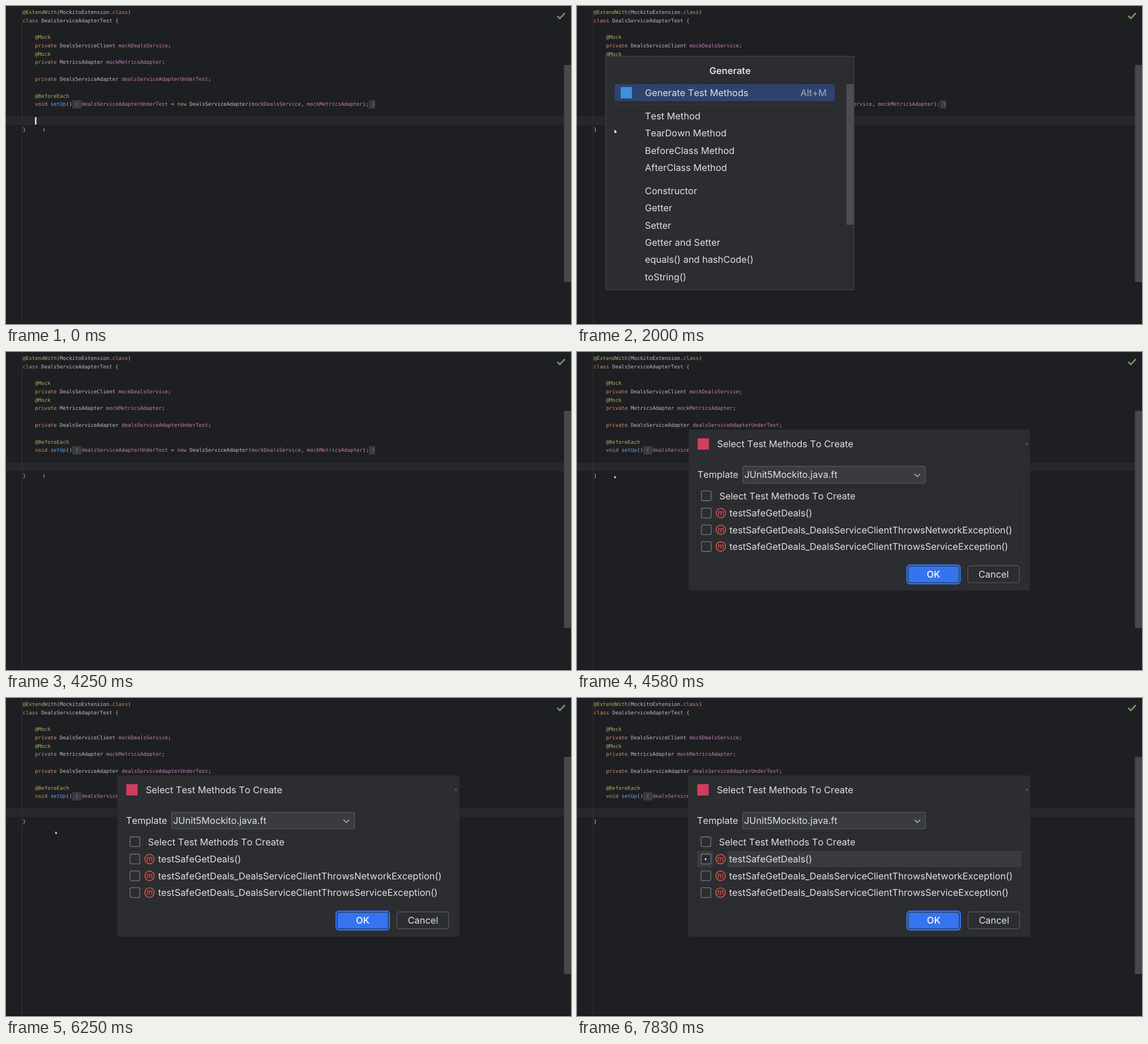
An HTML page with a canvas that plays this animation: 998x561 px, repeating every 8000 ms.

```html
<!DOCTYPE html>
<html lang="en">
<head>
<meta charset="utf-8">
<title>Generate test methods</title>
<style>
html, body { margin: 0; width: 100%; height: 100%; overflow: hidden; background: #1e1f22; }
canvas { display: block; }
</style>
</head>
<body>
<canvas id="stage" width="998" height="561"></canvas>
<script>
const ctx = document.getElementById('stage').getContext('2d');
const LOOP = 8000, FPS = 12;
const CODE_X = 29.5, PITCH = 5.46, LINE = 14.77, BASE = 13.8;
const CODE_FONT = '9.07px "DejaVu Sans Mono", monospace';
const UI_SIZE = 16.4;

const COLORS = {
  k: '#cf8e6d', t: '#bcbec4', f: '#c77dbb', a: '#b3ae60', m: '#56a8f5', b: '#7d8188'
};

// Each code line: row, first column, then pairs of colour key and text.
const CODE = [
  [0, 0, 'a', '@ExtendWith', 't', '(MockitoExtension.', 'k', 'class', 't', ')'],
  [1, 0, 'k', 'class', 't', ' DealsServiceAdapterTest {'],
  [3, 4, 'a', '@Mock'],
  [4, 4, 'k', 'private', 't', ' DealsServiceClient ', 'f', 'mockDealsService', 't', ';'],
  [5, 4, 'a', '@Mock'],
  [6, 4, 'k', 'private', 't', ' MetricsAdapter ', 'f', 'mockMetricsAdapter', 't', ';'],
  [8, 4, 'k', 'private', 't', ' DealsServiceAdapter ', 'f', 'dealsServiceAdapterUnderTest', 't', ';'],
  [10, 4, 'a', '@BeforeEach'],
  [11, 4, 'k', 'void', 't', ' ', 'm', 'setUp', 't', '()', 'b', ' { ',
    'f', 'dealsServiceAdapterUnderTest', 't', ' = ', 'k', 'new', 't', ' DealsServiceAdapter(',
    'f', 'mockDealsService', 't', ', ', 'f', 'mockMetricsAdapter', 't', ');', 'b', ' }'],
  [14, 0, 't', '}']
];

const MENU = [
  ['Generate Test Methods', 153], ['Test Method', 194], ['TearDown Method', 224.3],
  ['BeforeClass Method', 254.7], ['AfterClass Method', 285], ['Constructor', 326],
  ['Getter', 356.3], ['Setter', 386.7], ['Getter and Setter', 417],
  ['equals() and hashCode()', 447.5], ['toString()', 478]
];

const METHODS = [
  'testSafeGetDeals()',
  'testSafeGetDeals_DealsServiceClientThrowsNetworkException()',
  'testSafeGetDeals_DealsServiceClientThrowsServiceException()'
];

const clamp = v => Math.max(0, Math.min(1, v));
const easeOut = (p, power) => 1 - Math.pow(1 - p, power);

function rect(x, y, w, h, color) {
  ctx.fillStyle = color;
  ctx.fillRect(x, y, w, h);
}

function box(x, y, w, h, radius, fill, stroke, width = 1) {
  ctx.beginPath();
  ctx.roundRect(x, y, w, h, radius);
  if (fill) { ctx.fillStyle = fill; ctx.fill(); }
  if (stroke) { ctx.strokeStyle = stroke; ctx.lineWidth = width; ctx.stroke(); }
}

function path(points, stroke, width, fill) {
  ctx.beginPath();
  points.forEach(([x, y]) => ctx.lineTo(x, y));
  if (fill) ctx.closePath();
  if (stroke) { ctx.strokeStyle = stroke; ctx.lineWidth = width; ctx.stroke(); }
  if (fill) { ctx.fillStyle = fill; ctx.fill(); }
}

// Places interface text by the vertical centre of its capitals.
function label(text, x, centerY, { color = '#dfe1e5', align = 'left', weight = 400, size = UI_SIZE } = {}) {
  ctx.font = `${weight} ${size}px Inter, sans-serif`;
  ctx.textAlign = align;
  ctx.fillStyle = color;
  ctx.fillText(text, x, centerY + size * 0.364);
}

function drawCode() {
  for (const [row, startCol, ...tokens] of CODE) {
    const y = BASE + row * LINE;
    let x = CODE_X + startCol * PITCH;
    for (let i = 0; i < tokens.length; i += 2) {
      const key = tokens[i], text = tokens[i + 1];
      const width = text.length * PITCH;
      if (key === 'b') rect(x, y - 10.2, width, 14.8, '#393b40');
      ctx.font = CODE_FONT;
      ctx.textAlign = 'left';
      ctx.fillStyle = COLORS[key];
      ctx.fillText(text, x, y);
      x += width;
    }
  }
}

function drawEditor(caretOn) {
  rect(0, 0, 998, 561, '#1e1f22');
  rect(0, 195, 998, 15, '#26282e');
  rect(28, 0, 1, 561, '#313438');
  drawCode();
  if (caretOn) rect(51, 196, 3, 13, '#ced0d6');
  rect(985.5, 104, 12.5, 383, '#47484b');
  path([[973.8, 17.5], [978.3, 22], [987.2, 12.5]], '#6f9a62', 2.6);
  rect(0, 560, 998, 1, '#111214');
}

function drawMenu() {
  box(50.5, 88.5, 439, 412, 1, '#2b2d30', '#43454a');
  label('Generate', 270.3, 114.5, { align: 'center', weight: 600 });
  box(66.5, 138, 389, 29.7, 4, '#2e436e');
  rect(77, 143, 20, 20, '#3f8fdc');
  rect(66, 173, 389, 1, '#36383c');
  rect(66, 305, 389, 1, '#303236');
  MENU.forEach(([text, y]) => label(text, 120, y));
  label('Alt+M', 441, 153, { align: 'right', color: '#a3abbd' });
  rect(476, 138, 12.7, 248, '#4d4e51');
}

function checkbox(y) {
  box(219.2, y - 8.6, 17.2, 17.2, 2.5, '#2b2d30', '#73767c', 1.3);
}

function methodIcon(y) {
  ctx.beginPath();
  ctx.arc(253.5, y, 8.4, 0, Math.PI * 2);
  ctx.fillStyle = '#402929';
  ctx.fill();
  ctx.strokeStyle = '#db5c5c';
  ctx.lineWidth = 1.4;
  ctx.stroke();
  label('m', 253.5, y - 0.7, { align: 'center', color: '#db5c5c', size: 13 });
}

function drawDialog(hovered) {
  box(196.5, 136.5, 604.3, 284.5, 1, '#2b2d30');
  rect(212.5, 152, 20, 20, '#cf3f5c');
  label('Select Test Methods To Create', 247, 161.7);
  path([[792.8, 159.8], [796.4, 163.4]], '#85888e', 0.8);
  path([[796.4, 159.8], [792.8, 163.4]], '#85888e', 0.8);

  label('Template', 212, 216.3);
  box(292.5, 201.5, 323, 29.5, 3, '#393b40', '#55585e', 1.2);
  label('JUnit5Mockito.java.ft', 295, 216.3);
  path([[596.3, 214.7], [601.3, 219.7], [606.3, 214.7]], '#ced0d6', 1.3);

  box(212, 237.5, 573, 125.5, 0, null, '#26282b');
  rect(212, 268, 573, 1, '#25272a');
  rect(244, 238, 1, 30, '#25272a');
  if (hovered) {
    rect(212, 269.5, 28, 29, '#393b40');
    rect(266, 269.5, 519.3, 29, '#393b40');
  }
  checkbox(253.6);
  label('Select Test Methods To Create', 250.8, 253.6);
  METHODS.forEach((text, i) => {
    const y = 284.1 + i * 29.6;
    checkbox(y);
    methodIcon(y);
    label(text, 268.7, y);
  });

  box(583.2, 376.2, 93.8, 32.8, 5, '#22242a', '#3574f0', 2.4);
  box(585.5, 378.5, 89.2, 28.2, 3, '#3574f0');
  label('OK', 630, 392.3, { align: 'center', weight: 500, color: '#ffffff' });
  box(690.8, 377.3, 91, 30, 4, null, '#5a5d63', 1.2);
  label('Cancel', 736.5, 392.3, { align: 'center' });
}

function drawCursor(kind, x, y) {
  ctx.save();
  ctx.translate(x, y);
  if (kind === 'beam') {
    rect(-0.5, -2, 1, 4.4, '#b4b5b8');
    rect(-1.4, -2.4, 2.8, 0.6, '#909195');
    rect(-1.4, 2.1, 2.8, 0.6, '#909195');
  } else if (kind === 'hand') {
    path([[-1.4, -3], [-0.3, -3], [0, -1], [2.4, -0.4], [2.2, 2], [1.4, 3], [-0.6, 3], [-2.4, 0.6], [-1.2, 0.4]],
      '#111214', 0.8, '#ffffff');
  } else {
    path([[-1.5, -2.4], [1.8, 0.9], [0.6, 1.1], [1, 2.3], [0, 2.5], [-0.4, 1.5], [-1.5, 2.1]],
      '#08090a', 1, '#ffffff');
  }
  ctx.restore();
}

// Fades and scales a window about its centre while it opens.
function withPop(cx, cy, progress, alpha, draw) {
  const scale = 0.97 + 0.03 * easeOut(progress, 3);
  ctx.save();
  ctx.globalAlpha = alpha;
  ctx.translate(cx, cy);
  ctx.scale(scale, scale);
  ctx.translate(-cx, -cy);
  draw();
  ctx.restore();
}

function render(time) {
  const step = Math.floor((time + 4) * FPS / 1000);
  const menuOpen = step > 21 && step < 51;
  const dialogOpen = step > 51;
  const caretOn = step < 5 || (step >= 11 && step < 17);

  const travel = clamp((step - 74) / 10);
  const mouseX = 67.5 + 160 * easeOut(travel, 1.35);
  const mouseY = 220.5 + 63.5 * easeOut(travel, 3);

  drawEditor(caretOn);
  if (menuOpen) {
    const p = clamp((step - 21) / 3);
    withPop(270, 294.5, p, p, drawMenu);
  }
  if (dialogOpen) {
    const hovered = mouseX > 212 && mouseY > 269;
    withPop(498.6, 278.8, clamp((step - 51) / 7), clamp((step - 51) / 3), () => drawDialog(hovered));
  }

  if (dialogOpen) drawCursor('arrow', mouseX, mouseY);
  else if (step >= 21 && step < 51) drawCursor('hand', 67.5, 221);
  else drawCursor('beam', 67.3, 218.2);
}

ctx.textBaseline = 'alphabetic';
ctx.textRendering = 'geometricPrecision';
ctx.fontKerning = 'none';
const start = performance.now();

function tick() {
  render((performance.now() - start) % LOOP);
  requestAnimationFrame(tick);
}
tick();
</script>
</body>
</html>
```
